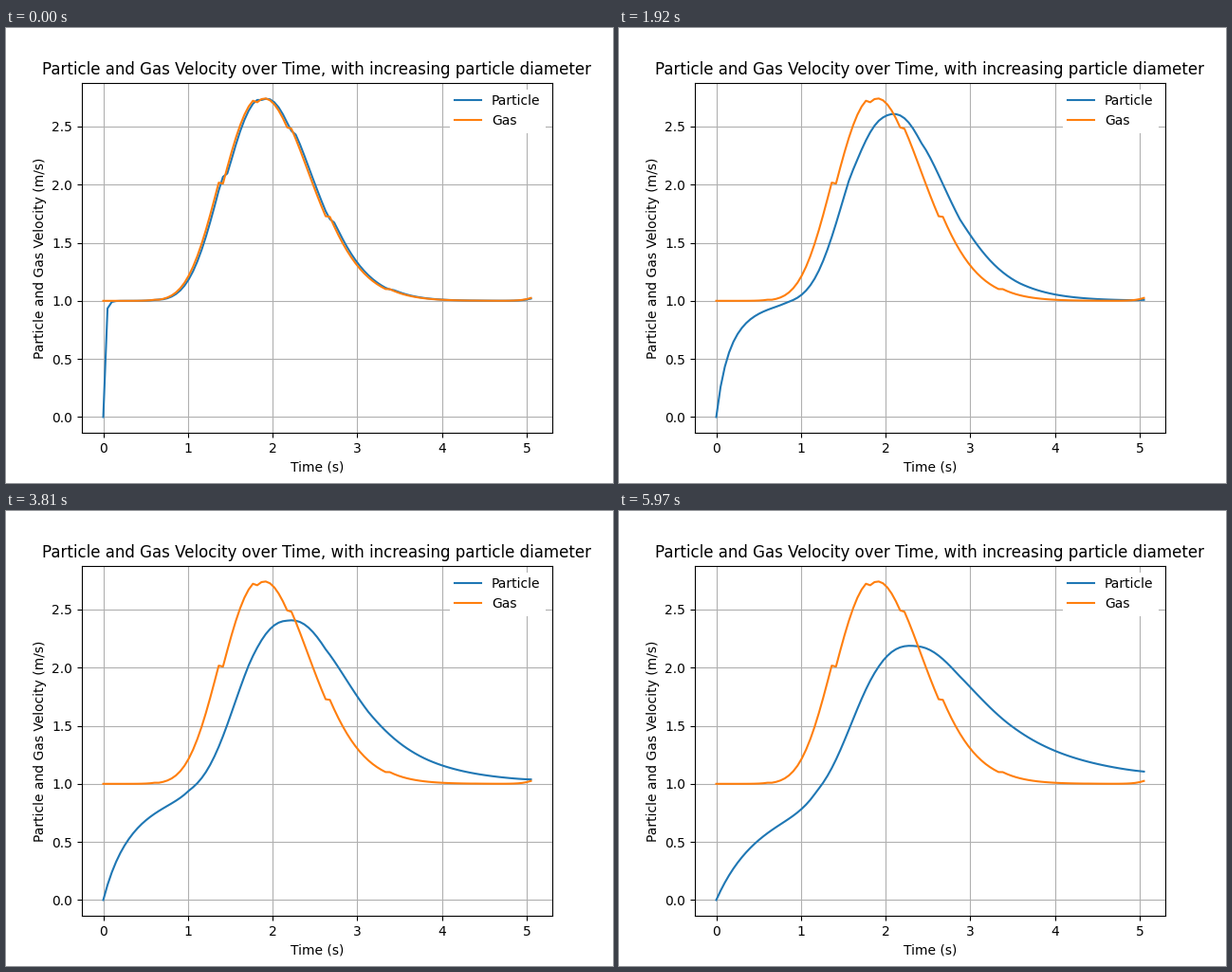
These frames come from a looping animation (640 px wide and 480 px high, 6 s). A matplotlib script:

```python
import numpy as np
import matplotlib.pyplot as plt
from matplotlib.animation import FuncAnimation

FRAMES = 200
INTERVAL = 30
DT = 5 / 99
STEPS = 100
SUB = 50

t = np.arange(STEPS + 1) * DT


def pulse(tau):
    """Skewed bell, slightly steeper on the rising side."""
    arg = np.maximum(tau + 1.0505, 1e-3) / 2.805
    return np.exp(-np.log(arg) ** 2 / 0.053)


def gas_velocity(time, cell):
    """Periodic pulse that reaches each cell one step later and a bit weaker."""
    tau = time - DT * cell
    return 1 + (1.781 - 0.013 * cell) * (pulse(tau) + pulse(tau - 4))


# Gas parcel: samples at which it enters the next cell, and where that is
crossings = np.array([13, 28, 36, 44, 53, 67, 87])
gas_cell = np.searchsorted(crossings, np.arange(STEPS + 1), side="right")
gas = gas_velocity(t, gas_cell)
gas_x = np.concatenate([[0], np.cumsum((gas[1:] + gas[:-1]) / 2 * DT)])
edges = (gas_x[crossings - 1] + gas_x[crossings]) / 2


def particle_paths():
    """Integrate the drag equation for every diameter at once."""
    diameter = 10 + np.arange(FRAMES)
    rate = 0.69 * (diameter / 209) ** -1.275
    x = np.zeros(FRAMES)
    v = np.zeros(FRAMES)
    out = np.zeros((STEPS + 1, FRAMES))
    h = DT / SUB
    for i in range(STEPS):
        for j in range(SUB):
            cell = np.searchsorted(edges, x, side="right")
            slip = gas_velocity(t[i] + (j + 0.5) * h, cell) - v
            accel = rate * slip * (1 + 1.4 * np.abs(slip) ** 0.687)
            x += h * (v + accel * h / 2)
            v += h * accel
        out[i + 1] = v
    return out.T


paths = particle_paths()

fig, ax = plt.subplots(figsize=(6.4, 4.8), dpi=100)
particle_line, = ax.plot(t, paths[0], color="C0", label="Particle")
ax.plot(t, gas, color="C1", label="Gas")

pad = 0.05
ax.set_xlim(-pad * t[-1], (1 + pad) * t[-1])
ax.set_ylim(-pad * 2.741, (1 + pad) * 2.741)
ax.set_title("Particle and Gas Velocity over Time, "
             "with increasing particle diameter")
ax.set_xlabel("Time (s)")
ax.set_ylabel("Particle and Gas Velocity (m/s)")
ax.grid(True)
ax.legend(loc="upper right", framealpha=1, edgecolor="none")


def update(n):
    particle_line.set_ydata(paths[n])
    return particle_line,


anim = FuncAnimation(fig, update, frames=FRAMES, interval=INTERVAL,
                     repeat=True, repeat_delay=0)
plt.show()
```
